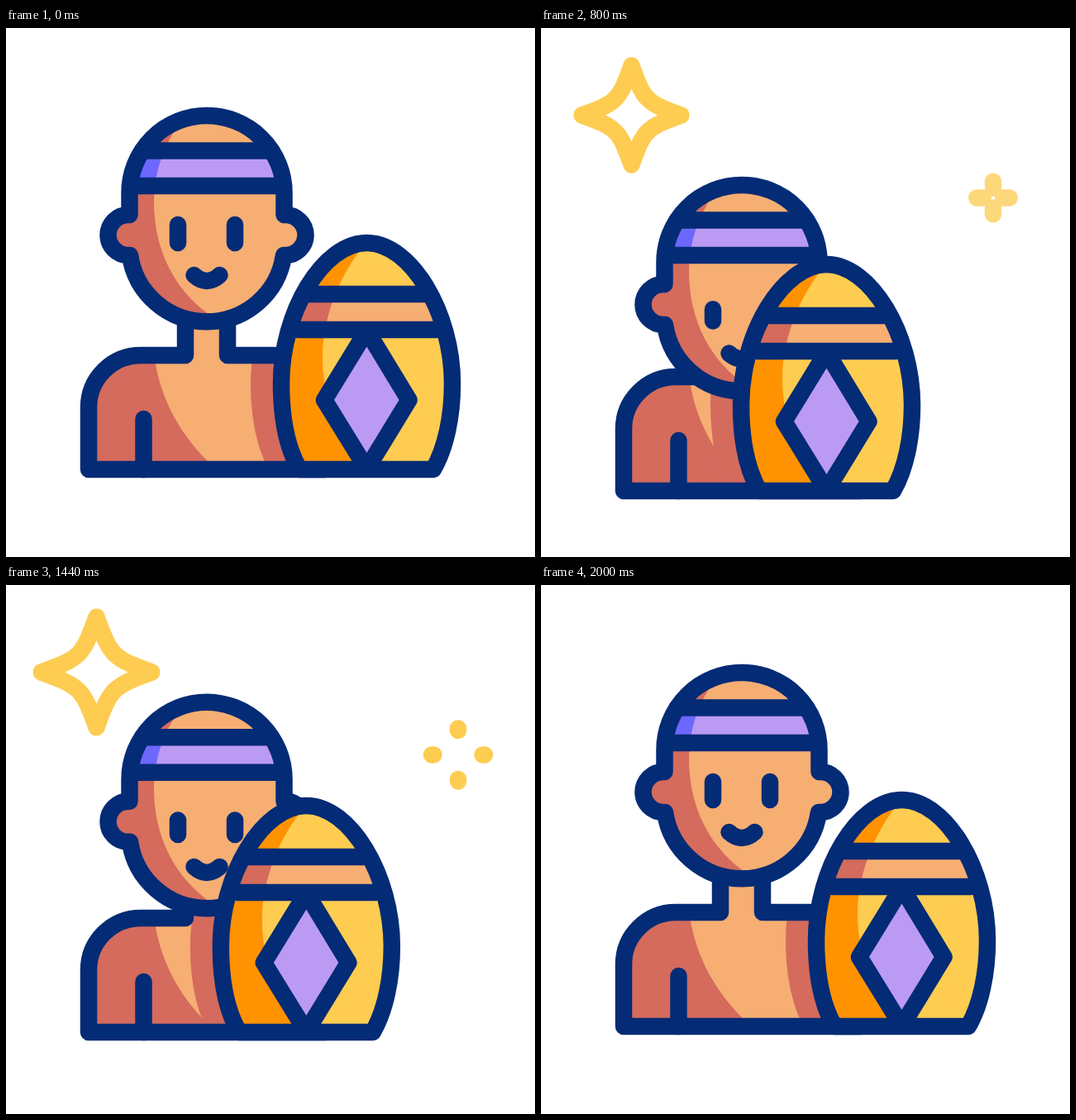
Write an HTML page that moves like this. It is 640x640 px and loops after 2.2 s.

```html
<!DOCTYPE html>
<html lang="en">
<head>
<meta charset="utf-8">
<title>Warrior with shield</title>
<style>
  html, body { margin: 0; height: 100%; overflow: hidden; background: #fff; }
  svg { display: block; width: 100vw; height: 100vh; }
  .line { fill: none; stroke: #042b75; }
  .line, .gold { stroke-width: 20.5; stroke-linecap: round; stroke-linejoin: round; }
  .gold { fill: none; stroke: #fdcc51; }
  .skin { fill: #f6ae73; }
  .shade { fill: #d46b5d; }
  .lilac { fill: #bb9af3; }
  .violet { fill: #6d67fe; }
  .yellow { fill: #fdcc51; }
  .orange { fill: #ff9200; }
</style>
</head>
<body>
<svg viewBox="0 0 640 640">
  <defs>
    <path id="torso" d="M217 345V396H163A63 63 0 0 0 100 459V534H386V459A63 63 0 0 0 323 396H268V345"/>
    <path id="skull" d="M149.5 226V199.5A93.5 93.5 0 0 1 336.5 199.5V226H338A24.5 24.5 0 0 1 338 275H336A94 94 0 0 1 150 275H148A24.5 24.5 0 0 1 148 226Z"/>
    <path id="egg" d="M436.5 260C490 260 540 345 540 430C540 470 532 508 517 534H355C340 508 333 470 333 430C333 345 383 260 436.5 260Z"/>
    <path id="faceShade" d="M212 112Q179 158 179 210C179 270 205 320 252 351L100 370V112Z"/>
    <path id="eggShade" d="M432 264C396 310 383 360 383 398C383 450 405 505 432 536H320V264Z"/>
    <clipPath id="torsoClip"><use href="#torso"/></clipPath>
    <clipPath id="skullClip"><use href="#skull"/></clipPath>
    <clipPath id="eggClip"><use href="#egg"/></clipPath>
    <clipPath id="headbandClip"><path d="M165 148H321L336 191H150Z"/></clipPath>
    <clipPath id="stripeClip"><path d="M300 322H580V365H300Z"/></clipPath>
  </defs>

  <path id="star" class="gold"/>
  <path id="sparkle" class="gold"/>
  <path id="rays" class="gold"/>

  <g id="body">
    <use href="#torso" class="skin"/>
    <g clip-path="url(#torsoClip)" class="shade">
      <path d="M179 394C186 450 212 495 254 534H90V394Z"/>
      <use id="shadow" href="#egg"/>
    </g>
    <use href="#torso" class="line"/>
    <path class="line" d="M166.5 473V534"/>
  </g>

  <g id="head">
    <use href="#skull" class="skin"/>
    <g clip-path="url(#skullClip)">
      <use href="#faceShade" class="shade"/>
      <g clip-path="url(#headbandClip)">
        <path class="lilac" d="M140 148H346V191H140Z"/>
        <use href="#faceShade" class="violet"/>
      </g>
    </g>
    <use href="#skull" class="line"/>
    <path class="line" d="M165 148.5H321M150 191H336"/>
    <path id="face" class="line"/>
  </g>

  <g id="shield">
    <use href="#egg" class="yellow"/>
    <g clip-path="url(#eggClip)">
      <use href="#eggShade" class="orange"/>
      <g clip-path="url(#stripeClip)">
        <path class="skin" d="M300 322H580V365H300Z"/>
        <use href="#eggShade" class="shade"/>
      </g>
    </g>
    <path class="line lilac" d="M436.5 366L487.5 450L436.5 533.5L385 450Z"/>
    <path class="line" d="M368 322H505M354 365H519"/>
    <use href="#egg" class="line"/>
  </g>
</svg>
<script>
const LOOP = 2200;
const $ = id => document.getElementById(id);

// Eased value at time t from keys [time, value], held outside the range.
function track(t, ...keys) {
  if (t <= keys[0][0]) return keys[0][1];
  for (let i = 1; i < keys.length; i++) {
    const [t0, a] = keys[i - 1], [t1, b] = keys[i];
    if (t < t1) return a + (b - a) * (1 - Math.cos(Math.PI * (t - t0) / (t1 - t0))) / 2;
  }
  return keys[keys.length - 1][1];
}

const move = (id, x, y) => $(id).setAttribute('transform', `translate(${x} ${y})`);

function show(id, d, opacity = 1) {
  $(id).setAttribute('d', d);
  $(id).setAttribute('opacity', opacity);
}

// Line along angle a (radians) between two distances from a centre.
function spoke(cx, cy, a, from, to) {
  const c = Math.cos(a), s = Math.sin(a);
  return `M${cx + c * from} ${cy + s * from}L${cx + c * to + 0.01} ${cy + s * to}`;
}

function starPath(x, y, r) {
  const p = (u, v) => `${x + u * r} ${y + v * r} `;
  return 'M' + p(0, -1) +
    'C' + p(.25, -.3) + p(.3, -.25) + p(1, 0) +
    'C' + p(.3, .25) + p(.25, .3) + p(0, 1) +
    'C' + p(-.25, .3) + p(-.3, .25) + p(-1, 0) +
    'C' + p(-.3, -.25) + p(-.25, -.3) + p(0, -1) + 'Z';
}

// Eyes and mouth slide down as the head ducks, and the eyes get shorter.
function facePath(duck) {
  const low = 11 * duck, top = 238 + 19 * duck;
  const eye = x => `M${x} ${top}V${260 + low}`;
  return eye(208) + eye(277) + `M227.5 ${299 + low}q15.5 14 31 0`;
}

function draw(t) {
  const bodyY = track(t, [220, 0], [737, 26], [1100, 26], [1620, 0]);
  const headY = track(t, [229, 0], [843, 85], [1075, 85], [1740, 0]);
  const shieldX = track(t, [350, 0], [895, -98], [1258, -98], [1803, 0]);
  move('body', 0, bodyY);
  move('head', 0, headY);
  move('shield', shieldX, bodyY);
  move('shadow', shieldX - 37, 0);
  show('face', facePath(track(t, [270, 0], [880, 1], [1150, 1], [1780, 0])));

  const r = track(t, [400, 0], [590, 68], [1040, 50], [1420, 68], [1660, 0]);
  show('star', starPath(109.5, 105.5, r), Math.min(1, r / 20));

  const tip = track(t, [690, 6], [960, 44], [1120, 32]);
  const len = track(t, [660, 7], [1120, 10], [1320, 10], [1500, 0]);
  const quarters = [0, 1, 2, 3].map(i => spoke(547, 205.5, i * Math.PI / 2, Math.max(0, tip - len), tip));
  show('sparkle', quarters.join(''), track(t, [640, 0], [880, 1], [1470, 1], [1570, 0]));

  const end = track(t, [900, 0], [1080, 17]);
  const start = track(t, [1160, 0], [1340, 17]);
  const rays = [[-1.29, 119], [-.62, 127.5], [.046, 121.5]]
    .map(([a, d]) => spoke(355, 364, a, d + start, d + end));
  show('rays', rays.join(''), track(t, [880, 0], [960, 1], [1280, 1], [1360, 0]));
}

const began = performance.now();
function tick() {
  draw((performance.now() - began) % LOOP);
  requestAnimationFrame(tick);
}
tick();
</script>
</body>
</html>
```
